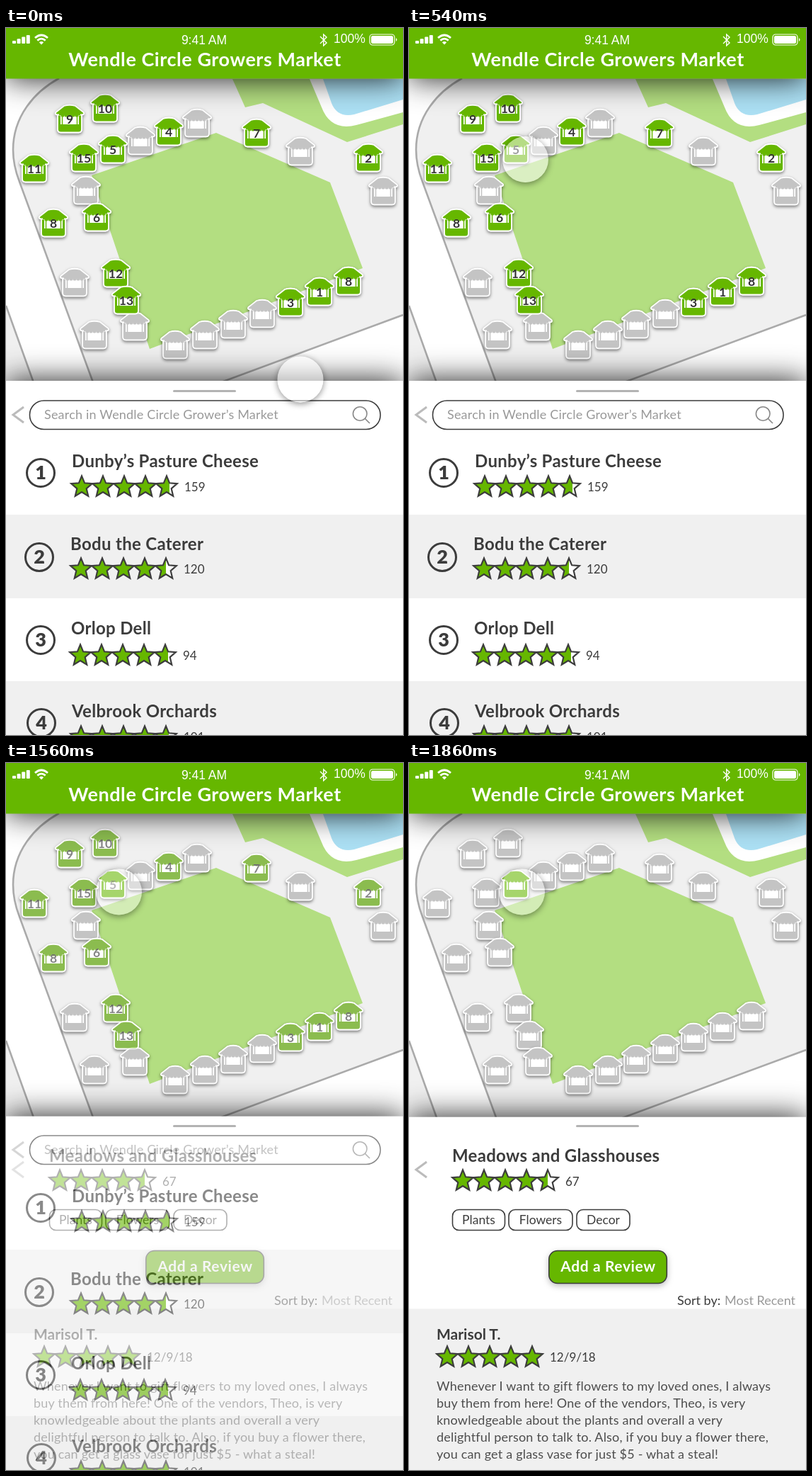
An HTML page for the animation above (1.88 s loop, 561 by 998 pixels).

```html
<!DOCTYPE html>
<html lang="en">
<head>
<meta charset="utf-8">
<title>Market map</title>
<style>
  html, body { margin: 0; width: 100%; height: 100%; overflow: hidden; background: #fff; }
  svg { display: block; width: 100%; height: 100%; }
  text { font-family: Lato, Inter, sans-serif; fill: #3c3c3c; font-size: 18px; letter-spacing: .2px; }
  .status { font-family: "Liberation Sans", Arial, sans-serif; font-size: 17.5px; letter-spacing: 0; fill: #fff; }
  .title { font-weight: 700; font-size: 27px; letter-spacing: .55px; fill: #fff; }
  .name { font-weight: 700; font-size: 24px; letter-spacing: .3px; }
  .count { font-size: 17px; letter-spacing: 0; }
  .rank { font-weight: 900; font-size: 27px; letter-spacing: 0; }
  .pinNo { font-weight: 700; font-size: 17.5px; letter-spacing: 0; fill: #333; }
  .tag { font-size: 17.5px; letter-spacing: 0; }
  .sort { letter-spacing: 0; }
  .button { font-weight: 700; font-size: 21px; letter-spacing: .6px; fill: #fff; }
  .author { font-weight: 700; font-size: 21px; letter-spacing: 0; }
  .review { fill: #4d4d4d; }
  .faint { fill: #999; }
  .mid { text-anchor: middle; }
  .line { fill: none; stroke: #3c3c3c; stroke-width: 1.6; }
  .road { fill: none; stroke: #aaa; stroke-width: 2.6; }
  .shade { filter: drop-shadow(0 0 22px rgba(0,0,0,.9)); }
  .pinShade { filter: drop-shadow(0 2px 2px rgba(0,0,0,.5)); }
  .buttonShade { filter: drop-shadow(0 3px 4px rgba(0,0,0,.25)); }
  .blur { filter: blur(4px); }
</style>
</head>
<body>
<svg id="stage" viewBox="0 0 561 998"></svg>
<script>
const LOOP = 1880;
const GREEN = '#66b700', GRAY = '#c4c4c4', LAWN = '#b3de81', PALE = '#f0f0f0';
const stage = document.getElementById('stage');

// [x, y, stall number]; no number means an unlisted stall
const pins = [
  [140, 113, 10], [90, 128, 9], [270, 134], [230, 146, 4], [354, 148, 7], [190, 159],
  [151, 171, 5], [416, 174], [110, 183, 15], [512, 183, 2], [40, 198, 11], [113, 229],
  [533, 230], [128, 267, 6], [67, 275, 8], [155, 346, 12], [484, 357, 8], [97, 359],
  [443, 372, 1], [170, 384, 13], [402, 387, 3], [362, 403], [321, 418], [182, 421],
  [281, 433], [125, 433], [239, 447]
];

const text = (x, y, cls, s) => `<text x="${x}" y="${y}" class="${cls}">${s}</text>`;
const rect = (x, y, w, h, attrs) => `<rect x="${x}" y="${y}" width="${w}" height="${h}" ${attrs}/>`;
const path = (d, attrs) => `<path d="${d}" ${attrs}/>`;

function stall(x, y, color) {
  const scallops = [-10, -5, 0, 5, 10].map(cx => `<circle cx="${cx}" cy="-5" r="2.6"/>`).join('');
  const outline = 'stroke="#fff" stroke-width="1.8"';
  return `<g transform="translate(${x} ${y})" fill="${color}">
    ${path('M-17 -6V15Q-17 19.5 -12.5 19.5H12.5Q17 19.5 17 15V-6Z', outline)}
    ${rect(-13, -6, 26, 14, 'fill="#fff"')}
    ${path('M-10.5 -5V8M10.5 -5V8', `stroke="${color}" stroke-width="1.5"`)}
    ${path('M-8 -18Q0 -20.5 8 -18L19.5 -9Q21.5 -6 17 -5.5H-17Q-21.5 -6 -19.5 -9Z', outline)}
    ${scallops}${rect(-15, -9, 30, 4, '')}</g>`;
}

function starPath(cx, cy) {
  return 'M' + Array.from({ length: 10 }, (_, i) => {
    const r = i % 2 ? 7 : 15.6, a = i * Math.PI / 5;
    return `${(cx + r * Math.sin(a)).toFixed(1)} ${(cy + 1 - r * Math.cos(a)).toFixed(1)}`;
  }).join('L') + 'Z';
}

function stars(x, y, rating) {
  let out = '';
  for (let i = 0; i < 5; i++) {
    const part = Math.min(1, rating - i), id = `s${x}-${y}-${i}`;
    out += `<linearGradient id="${id}"><stop offset="${part}" stop-color="${GREEN}"/><stop offset="${part}" stop-color="#fff"/></linearGradient>`
      + path(starPath(x + 30 * i, y), `fill="url(#${id})" stroke="#3c3c3c" stroke-width="2.2"`);
  }
  return out;
}

const chevron = y => path(`M25 ${y - 11}L10 ${y}L25 ${y + 11}`, 'fill="none" stroke="#bbb" stroke-width="3"');

function row(n, cx, cy, x, base, starX, starY, rating, name, count) {
  return `<circle cx="${cx}" cy="${cy}" r="19.5" class="line" style="stroke-width:3"/>`
    + text(cx, cy + 9, 'rank mid', n) + text(x, base, 'name', name)
    + stars(starX, starY, rating) + text(starX + 145, starY + 7, 'count', count);
}

const tag = (x, w, s) => rect(x, 630.5, w, 29, 'rx="9" class="line"') + text(x + w / 2, 651, 'tag mid', s);

const map = rect(0, 0, 561, 520, 'fill="#fff"')
  + path('M75 71C40 90 10 125 10 172C10 190 14 204 19 217L131 522H240L561 405V71Z', `fill="${PALE}"`)
  + path('M0 392L46 520H0Z', `fill="${PALE}"`)
  + path('M320 72L338 112L363 106L482 161L561 136V72Z', `fill="${LAWN}"`)
  + path('M429 72L446 112Q459 146 495 137L561 119V72Z', 'fill="#fff"')
  + path('M448 72L460 106Q468 127 492 122L561 101V72Z', 'fill="#ace0f4"')
  + path('M121 208L297 148L458 218L504 339L203 453Z', `fill="${LAWN}"`)
  + path('M75 71C40 90 10 125 10 172C10 190 14 204 19 217L131 522M0 392L46 520M250 520L561 405', 'class="road"');

const numbered = pins.filter(p => p[2]);
const chosen = numbered.find(p => p[2] === 5);
const label = ([x, y, n]) => text(x, y + 7, 'pinNo mid', n);

const header = rect(0, 0, 561, 71.5, `fill="${GREEN}" class="shade"`)
  + [0, 1, 2, 3].map(i => rect(9 + 6.6 * i, 18 - 2.7 * i, 5, 4 + 2.7 * i, 'rx="1" fill="#fff"')).join('')
  + path('M41 14Q50 6 59 14M44.3 17.6Q50 12.6 55.7 17.6', 'fill="none" stroke="#fff" stroke-width="2.8"')
  + path('M46.8 20.2Q50 17.8 53.2 20.2L50 23.5Z', 'fill="#fff"')
  + text(280, 23, 'status mid', '9:41 AM')
  + path('M444 12L453 21L448.7 25V9L453 13L444 22', 'fill="none" stroke="#fff" stroke-width="1.4"')
  + text(463, 21, 'status', '100%')
  + rect(514, 9, 35, 15, 'rx="4" fill="none" stroke="#fff" stroke-width="1.2"')
  + rect(516, 11, 31, 11, 'rx="2" fill="#fff"')
  + path('M551 14Q554 16.5 551 19Z', 'fill="#fff"')
  + text(281, 54, 'title mid', 'Wendle Circle Growers Market');

const list = rect(0, 687, 561, 118, `fill="${PALE}"`) + rect(0, 922, 561, 76, `fill="${PALE}"`)
  + chevron(546) + rect(33.5, 526, 495.5, 40.5, 'rx="20" class="line"')
  + text(54, 552, 'faint', 'Search in Wendle Circle Grower’s Market')
  + path('M507.5 551.5L514 558M510 544.5a9.8 9.8 0 1 0 -19.6 0a9.8 9.8 0 1 0 19.6 0', 'fill="none" stroke="#888" stroke-width="1.6"')
  + row(1, 49, 628, 93, 620, 107, 647, 4.65, 'Dunby’s Pasture Cheese', 159)
  + row(2, 47, 747, 91, 737, 106, 763, 4.5, 'Bodu the Caterer', 120)
  + row(3, 49, 864, 92, 856, 105, 885, 4.65, 'Orlop Dell', 94)
  + row(4, 50, 981, 93, 973, 106, 1000, 4.65, 'Velbrook Orchards', 101);

const review = [
  'Whenever I want to gift flowers to my loved ones, I always',
  'buy them from here! One of the vendors, Theo, is very',
  'knowledgeable about the plants and overall a very',
  'delightful person to talk to. Also, if you buy a flower there,',
  'you can get a glass vase for just $5 - what a steal!'
];

const detail = rect(0, 516, 561, 482, 'fill="#fff"') + rect(0, 770.5, 561, 228, `fill="${PALE}"`)
  + chevron(574) + text(61, 563, 'name', 'Meadows and Glasshouses')
  + stars(76, 589, 4.5) + text(221, 597, 'count', 67)
  + tag(61.5, 74, 'Plants') + tag(141, 90, 'Flowers') + tag(237, 75, 'Decor')
  + rect(197.8, 688.5, 166.5, 46, `rx="12" class="line buttonShade" style="fill:${GREEN}"`)
  + text(281.5, 718, 'button mid', 'Add a Review')
  + text(379, 765, 'sort', 'Sort by:') + text(446, 765, 'sort faint', 'Most Recent')
  + text(39, 814, 'author', 'Marisol T.') + stars(54, 838, 5) + text(199, 845, 'count', '12/9/18')
  + review.map((s, i) => text(39, 886 + 24 * i, 'review', s)).join('');

// The shadow is masked so that it never darkens the translucent disc
const touch = `<mask id="outside" maskUnits="userSpaceOnUse" x="-60" y="-60" width="120" height="120">
    ${rect(-60, -60, 120, 120, 'fill="#fff"')}<circle r="32.5"/></mask>
  <g mask="url(#outside)"><circle cy="2" r="33" fill-opacity=".4" class="blur"/></g>
  <circle id="disc" r="32.5" fill="#fff"/>`;

stage.innerHTML = map
  + pins.map(([x, y]) => `<g class="pinShade">${stall(x, y, GRAY)}</g>`).join('')
  + `<g id="open">${numbered.filter(p => p !== chosen).map(p => stall(p[0], p[1], GREEN) + label(p)).join('')}</g>`
  + stall(chosen[0], chosen[1], GREEN) + `<g id="chosenNo">${label(chosen)}</g>`
  + header + rect(0, 498, 561, 530, 'id="sheet" fill="#fff" class="shade"')
  + list + `<g id="detail">${detail}</g>`
  + rect(236, 511, 89, 3, 'rx="1.5" fill="#b3b3b3"')
  + `<g id="touch">${touch}</g>`;

const part = Object.fromEntries(['open', 'chosenNo', 'sheet', 'detail', 'touch', 'disc'].map(id => [id, document.getElementById(id)]));
const smooth = (t, from, span) => {
  const u = Math.min(1, Math.max(0, (t - from) / span));
  return u * u * (3 - 2 * u);
};
// Quick start, long settling tail
const remaining = (t, tau) => Math.exp(-Math.pow(t / tau, 1.7));

function draw(t) {
  const fade = smooth(t, 1420, 325);
  const x = 159.5 + 256.5 * remaining(t, 241), y = 182 + 314 * remaining(t, 223);
  part.touch.setAttribute('transform', `translate(${x} ${y})`);
  part.disc.setAttribute('fill-opacity', .52 - .1 * smooth(t, 1100, 320));
  part.open.setAttribute('opacity', 1 - fade);
  part.chosenNo.setAttribute('opacity', 1 - fade);
  part.detail.setAttribute('opacity', fade);
  part.sheet.setAttribute('y', 498 + 1.7 * fade);
}

const start = performance.now();
function tick() {
  draw((performance.now() - start) % LOOP);
  requestAnimationFrame(tick);
}
tick();
</script>
</body>
</html>
```
